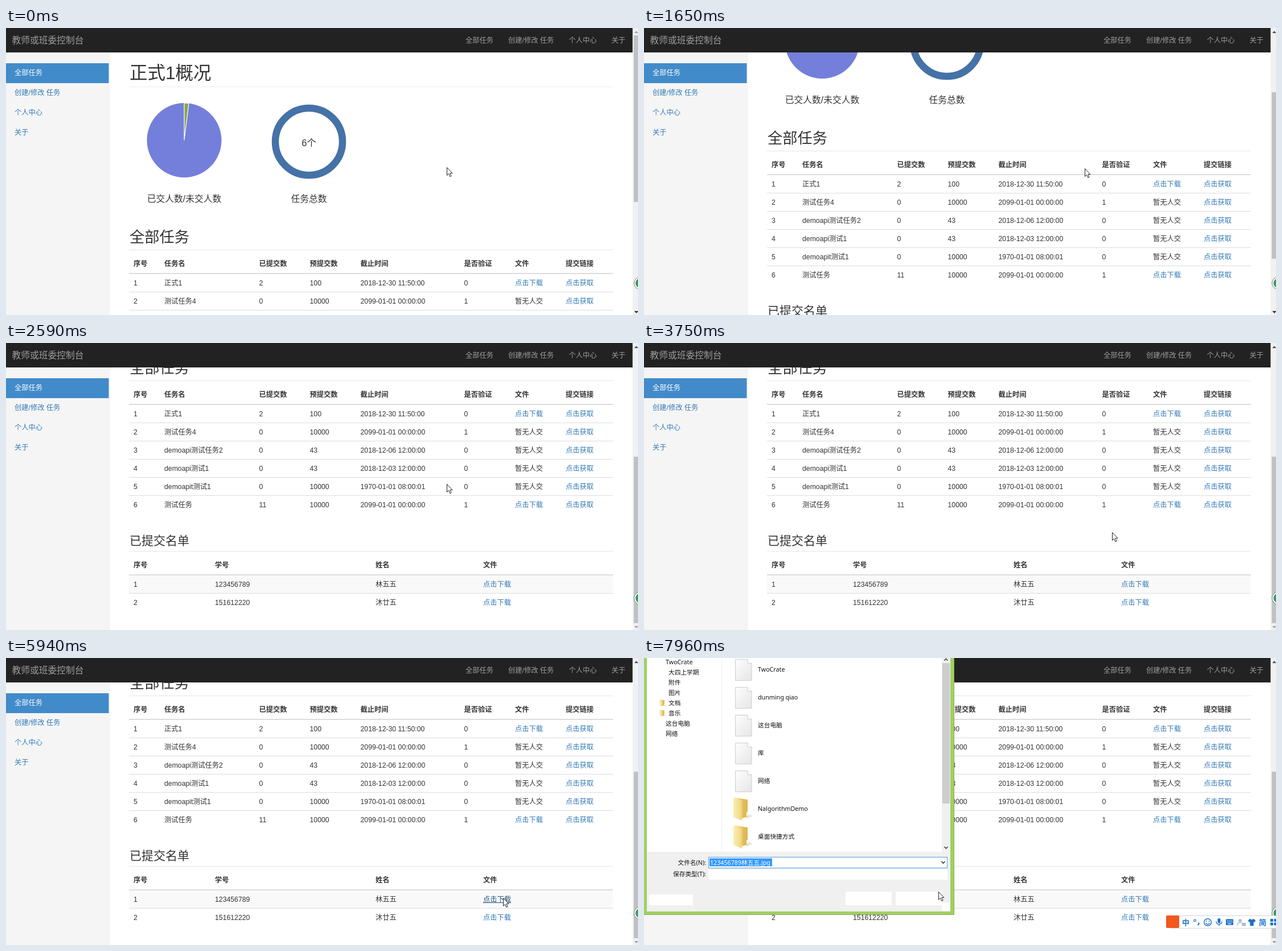
Recreate the animation shown at these times as an HTML page. Size 1110 by 505 pixels, loop 8 s.

```html
<!DOCTYPE html>
<html lang="zh-CN">
<head>
<meta charset="utf-8">
<title>控制台</title>
<style>
html, body { margin: 0; width: 100%; height: 100%; overflow: hidden; background: #fff; }
svg { display: block; width: 1110px; height: 505px; }
text { font-family: "Liberation Sans", "Noto Sans CJK SC", sans-serif; font-size: 12.25px; fill: #333; white-space: pre; }
.b { font-weight: 700; }
.light { font-weight: 300; }
.link { fill: #337ab7; }
.nav { fill: #9d9d9d; }
.ui { font-family: "Noto Sans", "Noto Sans CJK SC", sans-serif; font-size: 10.7px; fill: #111; }
.ime { fill: #1a73c8; font-size: 13px; font-weight: 700; }
.anim { animation: 8s step-end infinite; }
#page { animation-name: scroll; }
#thumb { animation-name: thumb; }
#up { animation-name: atTop; }
#down { animation-name: atEnd; }
#cursor { animation-name: move; }
#arrow { animation-name: arrow; }
#hand { animation-name: hand; }
#under { animation-name: under; }
#hot { animation-name: hot; }
#status { animation-name: status; }
#dialog { animation-name: dialog; }
#empty { animation-name: empty; }
#form { animation-name: form; }
#files { animation-name: files; }
#ime { animation-name: ime; }
@keyframes scroll {
  0% { transform: translateY(0); }
  11.25% { transform: translateY(-12px); }
  13.125% { transform: translateY(-50px); }
  15% { transform: translateY(-83px); }
  17% { transform: translateY(-91px); }
  18.75% { transform: translateY(-130px); }
  20.625% { transform: translateY(-174px); }
  22.625% { transform: translateY(-182px); }
  24.375% { transform: translateY(-200px); }
  26.375% { transform: translateY(-240px); }
  28.375% { transform: translateY(-273px); }
  30.375% { transform: translateY(-300px); }
  32.375%, 100% { transform: translateY(-324px); }
}
@keyframes thumb {
  0% { transform: translateY(0); }
  11.25% { transform: translateY(7px); }
  13.125% { transform: translateY(29px); }
  15% { transform: translateY(48px); }
  17% { transform: translateY(52px); }
  18.75% { transform: translateY(75px); }
  20.625% { transform: translateY(100px); }
  22.625% { transform: translateY(105px); }
  24.375% { transform: translateY(115px); }
  26.375% { transform: translateY(138px); }
  28.375% { transform: translateY(157px); }
  30.375% { transform: translateY(173px); }
  32.375%, 100% { transform: translateY(187px); }
}
@keyframes atTop { 0% { fill: #a3a3a3; } 11.25%, 100% { fill: #505050; } }
@keyframes atEnd { 0% { fill: #303030; } 32.375%, 100% { fill: #a3a3a3; } }
@keyframes move {
  0% { transform: translate(774px, 245px); }
  15% { transform: translate(774px, 246px); }
  20.625% { transform: translate(774px, 247px); }
  32.375% { transform: translate(774px, 248px); }
  40% { transform: translate(777px, 254px); }
  41.75% { transform: translate(787px, 272px); }
  43.5% { transform: translate(803px, 300px); }
  45.25% { transform: translate(822px, 333px); }
  47% { transform: translate(841px, 365px); }
  48.625% { transform: translate(857px, 392px); }
  50.375% { transform: translate(868px, 409px); }
  52.125% { transform: translate(873px, 416px); }
  54% { transform: translate(873px, 422px); }
  95% { transform: translate(760px, 425px); }
  97.5% { transform: translate(620px, 418px); }
  99.5%, 100% { transform: translate(517px, 411px); }
}
@keyframes arrow { 0% { opacity: 1; } 54% { opacity: 0; } 66.125%, 100% { opacity: 1; } }
@keyframes hand { 0% { opacity: 0; } 54% { opacity: 1; } 66.125%, 100% { opacity: 0; } }
@keyframes under { 0% { opacity: 0; } 54% { opacity: 1; } 88%, 100% { opacity: 0; } }
@keyframes hot { 0% { fill: #337ab7; } 54% { fill: #23527c; } 88%, 100% { fill: #337ab7; } }
@keyframes status {
  0% { opacity: 0; }
  56% { opacity: .6; }
  58% { opacity: 1; }
  70.25% { opacity: .66; }
  72.25% { opacity: .33; }
  74.25%, 100% { opacity: 0; }
}
@keyframes dialog { 0% { opacity: 0; } 88%, 100% { opacity: 1; } }
@keyframes empty { 0% { opacity: 1; } 90.5%, 100% { opacity: 0; } }
@keyframes form { 0% { opacity: 0; } 90.5%, 100% { opacity: 1; } }
@keyframes files { 0% { opacity: 0; } 92.5%, 100% { opacity: 1; } }
@keyframes ime { 0% { opacity: 0; } 77.75% { opacity: 1; } 81.625% { opacity: 0; } 95%, 100% { opacity: 1; } }
</style>
</head>
<body>
<svg viewBox="0 0 1110 505">
  <defs>
    <linearGradient id="paper" x2="1" y2="1"><stop stop-color="#fdfdfd"/><stop offset="1" stop-color="#e6e6e6"/></linearGradient>
    <linearGradient id="cover" x2="1"><stop stop-color="#fbeeb6"/><stop offset="1" stop-color="#f0d47c"/></linearGradient>
    <linearGradient id="inside" x2="1"><stop stop-color="#f0d074"/><stop offset="1" stop-color="#dcb450"/></linearGradient>
    <g id="doc">
      <path d="M.5 .5H22L29 7.500V37.500H.5Z" fill="url(#paper)" stroke="#cdcdcd"/>
      <path d="M22 .5V7.500H29" fill="#fff" stroke="#cdcdcd"/>
    </g>
    <g id="folder">
      <path d="M22 27L35 33 24 38Z" fill="#aaa" opacity=".3"/>
      <path d="M4 1L26 4V34L14 38Z" fill="url(#inside)"/>
      <path d="M1 2L4 0 16 6V41L1 35Z" fill="url(#cover)"/>
      <rect x="24" y="26" width="3" height="7" fill="#f4f6f8"/>
    </g>
  </defs>
  <rect width="1110" height="505" fill="#fff"/>
  <g id="page" class="anim"></g>
  <g id="side"></g>
  <g id="bar"></g>
  <g id="status" class="anim"></g>
  <g id="dialog" class="anim">
    <g id="frame"></g>
    <g id="empty" class="anim"></g>
    <g id="form" class="anim"></g>
    <g id="files" class="anim"></g>
    <g id="buttons"></g>
  </g>
  <g id="ime" class="anim"></g>
  <g id="cursor" class="anim">
    <path id="arrow" class="anim" d="M.5 .5V14.300L3.600 11.400 5.800 16.500 8 15.600 5.900 10.600H10Z" fill="#fff" stroke="#222"/>
    <path id="hand" class="anim" d="M-2.500 2.500C-2.500 .5 .2 .5 .3 2.500V7.500C1.500 6.500 3 7 3.200 8.200 4.300 7.500 5.600 8 5.900 9.200 7.200 8.600 8.300 9.500 8.300 11V14C8.300 16 7 16.500 6.800 18.500H-.5C-1 16.500-4.500 13.500-5.800 11.500-6.300 9.800-4.500 9.300-2.500 11.500Z" fill="#fff" stroke="#222"/>
  </g>
</svg>
<script>
const put = (id, ...parts) => document.getElementById(id).innerHTML = parts.flat().join('');
const text = (x, y, s, cls = '', size = 0, extra = '') =>
  `<text x="${x}" y="${y}" class="${cls}" ${size ? `style="font-size:${size}px"` : ''} ${extra}>${s}</text>`;
const rect = (x, y, w, h, fill, extra = '') =>
  `<rect x="${x}" y="${y}" width="${w}" height="${h}" fill="${fill}" ${extra}/>`;
const path = (d, color, w = 1, fill = 'none', extra = '') =>
  `<path d="${d}" stroke="${color}" stroke-width="${w}" fill="${fill}" ${extra}/>`;
const circle = (x, y, r, fill, stroke = 'none', w = 1) =>
  `<circle cx="${x}" cy="${y}" r="${r}" fill="${fill}" stroke="${stroke}" stroke-width="${w}"/>`;
const rule = (y, h = 1, c = '#ddd') => rect(216, y, 850, h, c);
const row = (y, xs, cells, cls = '') =>
  cells.map((s, i) => text(xs[i], y, s, /^点击/.test(s) ? 'link' : cls));
const middle = 'text-anchor="middle"', end = 'text-anchor="end"';

// Main page
const cols = [224, 278, 444.5, 533.5, 622.5, 804.5, 894, 983];
const get = '点击获取', load = '点击下载', none = '暂无人交';
const far = '2099-01-01 00:00:00';
const tasks = [
  ['正式1', '2', '100', '2018-12-30 11:50:00', '0', load],
  ['测试任务4', '0', '10000', far, '1', none],
  ['demoapi测试任务2', '0', '43', '2018-12-06 12:00:00', '0', none],
  ['demoapi测试1', '0', '43', '2018-12-03 12:00:00', '0', none],
  ['demoapit测试1', '0', '10000', '1970-01-01 08:00:01', '0', none],
  ['测试任务', '11', '10000', far, '1', load]
];
const cols2 = [224, 367, 649, 838];
const person = '林五五';
const slice = 2 / 102 * 2 * Math.PI;
const sx = 313 + 65.5 * Math.sin(slice), sy = 197.5 - 65.5 * Math.cos(slice);

put('page',
  text(217, 90, '正式1概况', 'light', 31.5), rule(103, 1, '#eee'),
  circle(313, 197.5, 65.5, '#747fdb'),
  path(`M313 197.500V132A65.500 65.500 0 0 1 ${sx} ${sy}Z`, '#fff', 1.2, '#89a54e'),
  circle(532, 200, 59, 'none', '#4572a7', 12.5),
  text(532, 208, '6个', '', 16.5, middle),
  text(313, 306, '已交人数/未交人数', '', 15.75, middle),
  text(532, 306, '任务总数', '', 15.75, middle),
  text(217, 377, '全部任务', 'light', 26.25), rule(390, 1, '#e6e6e6'),
  row(419, cols, ['序号', '任务名', '已提交数', '预提交数', '截止时间', '是否验证', '文件', '提交链接'], 'b'),
  rule(431, 2),
  tasks.map((t, i) => row(453 + 32 * i, cols, [i + 1, ...t, get]).join('') + (i < 5 ? rule(464 + 32 * i) : '')),
  text(217, 679, '已提交名单', 'light', 21), rule(690, 1, '#e6e6e6'),
  row(719, cols2, ['序号', '学号', '姓名', '文件'], 'b'),
  rect(216, 733, 850, 31, '#f9f9f9'), rule(731, 2), rule(764),
  row(753, cols2, ['1', '123456789', person]),
  text(838, 753, load, 'link anim', 0, 'id="hot"'),
  `<g id="under" class="anim">${rect(838, 754, 49, 1, '#23527c')}</g>`,
  row(785, cols2, ['2', '151612220', '沐廿五', load]));

// Sidebar, top bar, scrollbar
const menu = ['全部任务', '创建/修改 任务', '个人中心', '关于'];
const navX = [807, 882, 988.5, 1063.5];
put('side',
  rect(0, 43, 181, 462, '#f5f5f5'), rect(181, 43, 1, 462, '#eee'),
  rect(0, 62, 180.5, 35, '#428bca'),
  menu.map((s, i) => text(15, 83 + 35 * i, s, i ? 'link' : '', 0, i ? '' : 'style="fill:#fff"')),
  rect(0, 0, 1101, 43, '#222'),
  text(10.5, 27, '教师或班委控制台', 'nav', 15.75),
  menu.map((s, i) => text(navX[i], 26, s, 'nav')));

put('bar',
  rect(1100.5, 0, 9.5, 505, '#f1f1f1'),
  `<g id="thumb" class="anim">${rect(1102.5, 13, 7.5, 293, '#c1c1c1')}</g>`,
  '<path id="up" class="anim" d="M1103.500 9L1107 5 1110 8.500V9Z"/>',
  '<path id="down" class="anim" d="M1103.500 498H1110V499L1107 502Z"/>',
  circle(1114, 449, 11, '#fff', '#777'), circle(1114, 449, 8.5, '#3d9a5f'));

put('status',
  path('M-1 487.500H365Q368.500 487.500 368.500 491V506H-1Z', '#e0e0e0', 1, '#fafafa'),
  text(0, 501, `welpor.ink:8082/teacher/file/9?filename=123456789${person}.jpg`, 'ui', 10.75, 'fill-opacity=".6"'));

// Save dialog
put('frame',
  rect(0, 0, 545, 452, '#86ae4a'), rect(0, 0, 544, 451, '#a2cf62'),
  rect(5, 0, 533, 446, '#fff'), rect(5, 398, 533, 48, '#f0f0f0'));
put('empty', text(301, 17, '该文件夹为空。', 'ui', 0, 'fill-opacity=".65"'));
put('form',
  rect(5, 341, 533, 60, '#f0f0f0'),
  rect(136, 0, 1, 341, '#f0f0f0'),
  rect(523, 0, 15, 341, '#f0f0f0'), rect(524, 9, 13, 247, '#cdcdcd'),
  path('M527.500 4.500L530.500 1.500 533.500 4.500M527.500 332L530.500 335 533.500 332', '#444', 1.6),
  text(109, 363.5, '文件名(N):', 'ui', 0, end),
  text(109, 384, '保存类型(T):', 'ui', 0, end),
  rect(113.5, 350.5, 419, 19, '#fff', 'stroke="#569de5"'),
  rect(115, 352.5, 110, 14, '#3399ff'),
  text(116, 363.5, `123456789${person}.jpg`, 'ui', 0, 'style="fill:#fff"'),
  path('M522.500 358L525.500 361 528.500 358', '#333', 1.6),
  rect(113, 372, 420, 18, '#fff'));

const tree = [[38, 'TwoCrate'], [43, '大四上学期'], [43, '附件'], [43, '图片'], [43, '文档'], [43, '音乐'], [38, '这台电脑'], [38, '网络']];
const items = ['TwoCrate', 'dunming qiao', '这台电脑', '库', '网络', 'NalgorithmDemo', '桌面快捷方式'];
put('files',
  tree.map(([x, s], i) => text(x, 11 + 18 * i, s, 'ui')),
  [73, 91].map(y => `<use href="#folder" transform="translate(27 ${y}) scale(.34 .3)"/>`),
  items.map((s, i) => {
    const icon = i < 5 ? `<use href="#doc" x="160" y="${2 + 49 * i}"/>` : `<use href="#folder" x="156" y="${49 * i}"/>`;
    return icon + text(200, 24 + 49 * i, s, 'ui');
  }));
put('buttons',
  rect(9, 416, 77, 19, '#fff'), rect(354, 411, 81, 24, '#fff'),
  rect(442, 411, 81, 24, '#fff'), rect(523, 430, 15, 15, '#fff'));

// Input method bar
const blue = '#1a73c8', pale = '#a9bdd2';
put('ime',
  rect(925, 453.5, 190, 22, '#fff', 'stroke="#d0d4da"'),
  rect(917, 453, 23, 22, '#f2571f', 'rx="2"'),
  text(945, 469.5, '中', 'ime'), text(1080, 469.5, '简', 'ime'),
  circle(967.5, 462, 1.8, 'none', blue, 1.2),
  path('M974 465.500Q975.500 468 972.500 470', blue, 2),
  circle(990, 465, 6.3, 'none', blue, 1.4),
  path('M987.500 462V464M992.500 462V464M986.500 466.500Q990 471 993.500 466.500', blue, 1.3),
  rect(1007.5, 458, 5, 8.5, blue, 'rx="2.500"'),
  path('M1005 463.500Q1005 468.500 1010 468.500 1015 468.500 1015 463.500M1010 468.500V471.500', blue, 1.3),
  rect(1022, 459.5, 13, 10.5, blue, 'rx="1"'),
  path('M1024 462.500H1033.500M1024 465H1033.500', '#fff', 1.2, 'none', 'stroke-dasharray="1.600 1"'),
  path('M1025.500 467.800H1031.500', '#fff', 1.2),
  circle(1047, 462, 2.8, pale),
  path('M1042 471Q1042 465.500 1047 465.500 1050 465.500 1051 467', pale, 1.4),
  rect(1050, 466, 7, 5.5, pale),
  path('M1064 459L1061 462.500 1063.500 465 1064.500 464V471H1070.500V464L1071.500 465 1074 462.500 1071 459Q1067.500 462 1064 459Z', blue, .5, blue),
  [1100, 1106.5].map(x => [459, 465.5].map(y => rect(x, y, 5, 5, blue, 'rx=".8"')).join('')));
</script>
</body>
</html>
```
